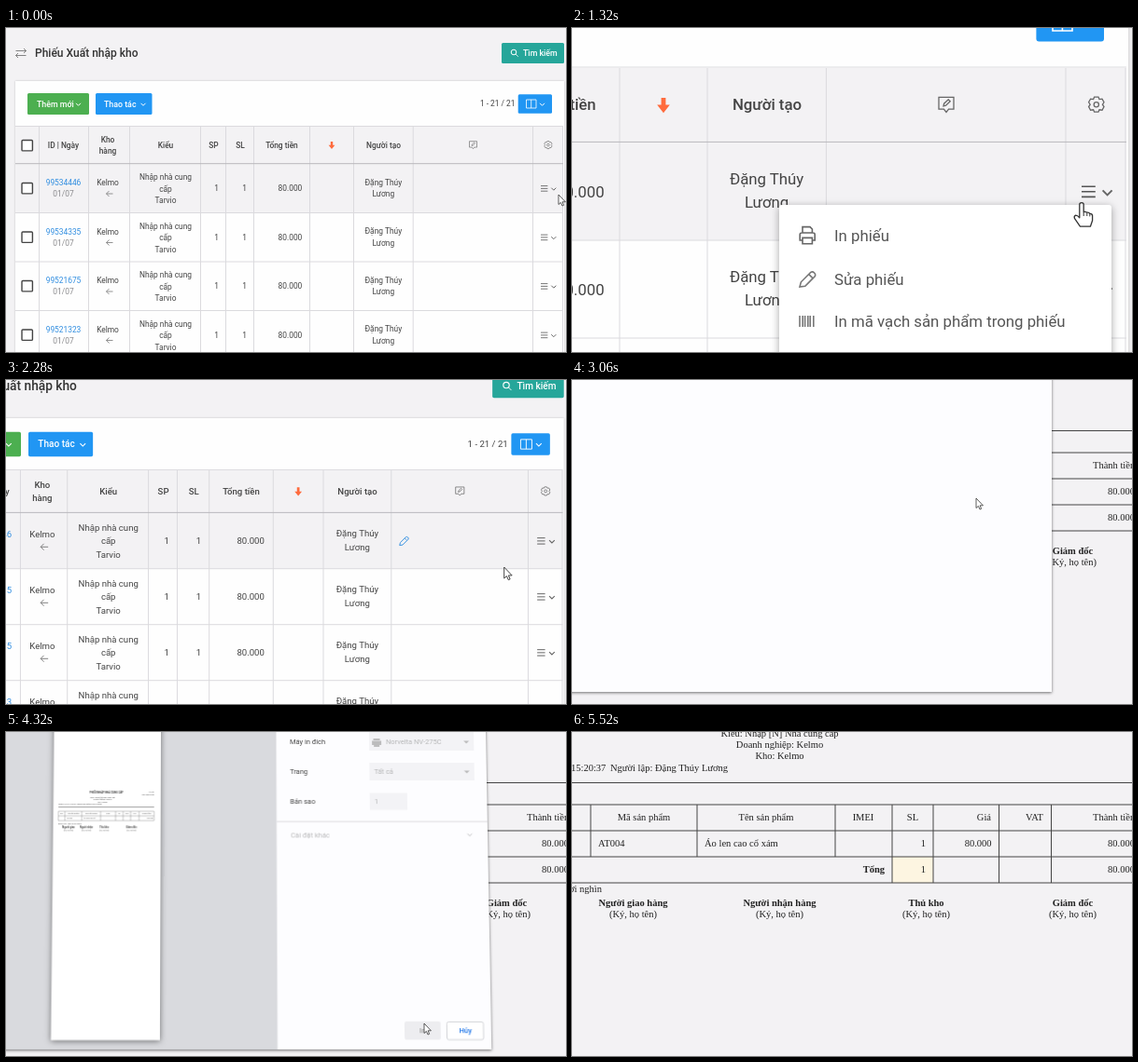
Recreate the animation shown at these times as an HTML page. Size 600x348 px, loop 5.7 s.

```html
<!DOCTYPE html>
<html lang="vi">
<head>
<meta charset="utf-8">
<title>Phiếu Xuất nhập kho</title>
<style>
html, body { margin: 0; width: 100%; height: 100%; overflow: hidden; background: #f3f2f4; }
#stage { position: relative; width: 600px; height: 348px; overflow: hidden; }
svg { position: absolute; left: 0; top: 0; width: 600px; height: 348px; overflow: visible; }
text { font: 8.4px Roboto, sans-serif; fill: #444; white-space: pre; }
.b { font-weight: 500; }
.m { text-anchor: middle; }
.e { text-anchor: end; }
.w { fill: #fff; font-size: 8.8px; font-weight: 500; }
.title { font-size: 12px; font-weight: 500; fill: #333; }
.id { fill: #2f8de0; }
.dim { fill: #8b8b8e; }
.line { fill: none; stroke: #666; stroke-width: .8; }
.thin { fill: none; stroke: #dbdade; vector-effect: non-scaling-stroke; }
#menu text { fill: #555; }
#paper text { font: 10.5px "Liberation Serif", serif; fill: #222; }
#paper .b { font-weight: 700; }
#dialog { position: absolute; left: -80px; top: -20px; width: 594px; height: 355px; background: #fdfdff;
  box-shadow: 0 1px 3px rgba(0,0,0,.55); transform-origin: 300px 20px; }
#dialog svg { left: 80px; top: 20px; }
#dialog text { font-size: 7.5px; }
#dialog .tiny { font-size: 2.1px; }
#dialog .head { font-size: 2.7px; font-weight: 700; }
#print rect { fill: #1a73e8; }
#print text { fill: #fff; }
.off .field { opacity: .38; }
.off #print rect { fill: #ededf0; }
.off #print text { fill: #999; }
</style>
</head>
<body>
<div id="stage">
  <svg><g id="table"></g><g id="paper"></g></svg>
  <div id="dialog"><svg id="form"></svg></div>
  <svg><g id="cursor" stroke-linejoin="round">
    <path id="arrow" d="M0 0V10.5L2.4 8.4 4 12 5.6 11.3 4.1 7.8H7.4Z" fill="#fff" stroke="#333" stroke-width=".8"/>
    <g id="hand" fill="#fff" stroke="#333" stroke-width=".65">
      <path d="M-1.1 .9Q-1.1 -.2 0 -.2Q1.1 -.2 1.1 .9V4.8Q2 4.4 2.9 5.1Q3.9 4.8 4.4 5.7Q5.7 5.6 5.8 6.8V9.4L4.7 12.6H-.8L-3.8 8.2Q-4.2 7 -3.2 6.6Q-2.2 6.6 -1.1 7.9Z"/>
      <path d="M1.1 5V7M2.9 5.3V7M4.4 5.8V7.2" fill="none" stroke-width=".5"/>
    </g>
  </g></svg>
</div>
<script>
const $ = id => document.getElementById(id);
const text = (x, y, s, c = '') => `<text x="${x}" y="${y}" class="${c}">${s}</text>`;
const rect = (x, y, w, h, fill, more = '') => `<rect x="${x}" y="${y}" width="${w}" height="${h}" fill="${fill}" ${more}/>`;
const path = (d, c = 'line', more = '') => `<path d="${d}" class="${c}" ${more}/>`;
const chevron = (x, y, color = '#666') =>
  path(`M${x - 2.5} ${y - 1.2}l2.5 2.5 2.5 -2.5`, 'line', `style="stroke:${color};stroke-width:1"`);
const pencil = (x, y, color) =>
  path(`M${x - 4} ${y + 4}l.7 -2.6 5.2 -5.2q1 -.6 1.9 .3t.3 1.9l-5.2 5.2ZM${x + .8} ${y - 2.8}l2 2`, 'line', `style="stroke:${color}"`);

const person = ['Đặng Thúy', 'Lương'];
const shop = 'Kelmo';

function tableRow(id, i) {
  const y = 146 + 52.5 * i;
  const at = (x, dy, s, c) => text(x, y + dy, s, c);
  return rect(10, y, 587, 52.5, i ? '#fefefe' : '#f3f2f4') +
    rect(17, y + 20.5, 11.4, 11.4, '#fff', 'rx="1" stroke="#444" stroke-width="1.4"') +
    at(61.5, 23, id, 'm id') + at(61.5, 35, '01/07', 'm dim') +
    at(109, 23, shop, 'm') + path(`M114.5 ${y + 32}h-7m3 -3l-3 3 3 3`, 'line', 'style="stroke:#777"') +
    at(171, 17, 'Nhập nhà cung', 'm') + at(171, 29.5, 'cấp', 'm') + at(171, 42, 'Tarvio', 'm') +
    at(228, 29.3, '1', 'e') + at(258, 29.3, '1', 'e') + at(317.3, 29.3, '80.000', 'e') +
    at(404.3, 22.5, person[0], 'm') + at(404.3, 35, person[1], 'm') +
    path(`M573 ${y + 23.6}h7.4m-7.4 2.8h7.4m-7.4 2.8h7.4`, 'line', 'style="stroke:#555"') + chevron(586.8, y + 26.9);
}

function menu() {
  const item = (y, s) => text(440.5, y + 3, s);
  const bars = [0, 1.6, 2.8, 4.4, 5.6, 7.4].map(x => `M${422 + x} 239v6`).join('');
  return `<g id="menu">` +
    rect(411, 179.5, 178, 120, '#fff', 'rx="1.5" style="filter:drop-shadow(0 1px 2px rgba(0,0,0,.35))"') +
    `<g id="hover">${rect(411, 184.5, 178, 23, '#f0f0f2')}</g>` +
    path('M423.5 194.5v-3.2h4l1.2 1.2v2M423.5 198.5h-1.4v-3q0 -1 1 -1h6q1 0 1 1v3h-1.4M423.5 197.2h5.2v3.2h-5.2Z') +
    pencil(426, 219.5, '#777') + path(bars, 'line', 'style="stroke:#777"') +
    item(196, 'In phiếu') + item(219.5, 'Sửa phiếu') + item(242, 'In mã vạch sản phẩm trong phiếu') + `</g>`;
}

function table() {
  const cols = [35.5, 88.5, 132.5, 208.5, 235.5, 265.5, 325.5, 372.5, 436.2, 564.5, 596.5];
  const heads = [[61.5, 'ID | Ngày'], [171, 'Kiểu'], [222.5, 'SP'], [251, 'SL'], [295.5, 'Tổng tiền'], [404.5, 'Người tạo']];
  return rect(0, 0, 600, 400, '#f3f2f4') +
    path('M10.5 24.5h11m-2.5 -2.5l2.5 2.5 -2.5 2.5M21.5 29.5h-11m2.5 -2.5l-2.5 2.5 2.5 2.5') +
    text(31, 31, 'Phiếu Xuất nhập kho', 'title') +
    rect(531, 16, 67, 22, '#26a69a', 'rx="1.5"') +
    `<circle cx="544" cy="26" r="2.8" fill="none" stroke="#fff"/>` + path('M546 28l2.8 2.8', 'line', 'style="stroke:#fff"') +
    text(554, 30, 'Tìm kiếm', 'w') +
    rect(10, 57, 588, 330, '#fefefe', 'style="filter:drop-shadow(0 0 1px rgba(0,0,0,.2))"') +
    rect(23, 70, 66, 23, '#4caf50', 'rx="1.5"') + text(33, 84.5, 'Thêm mới', 'w') + chevron(77.5, 82, '#fff') +
    rect(96, 70, 60.5, 23, '#2196f3', 'rx="1.5"') + text(105, 84.5, 'Thao tác', 'w') + chevron(147, 82, '#fff') +
    text(545.5, 83.8, '1 - 21 / 21', 'e') +
    rect(548.7, 71.2, 36.3, 20.5, '#2196f3', 'rx="1.5"') +
    path('M557.5 77h10.5v9h-10.5ZM562.7 77v9', 'line', 'style="stroke:#fff"') + chevron(574.5, 82, '#fff') +
    rect(10, 106, 587, 40, '#f3f2f4') +
    rect(17, 120.5, 11.4, 11.4, '#fff', 'rx="1" stroke="#444" stroke-width="1.4"') +
    heads.map(([x, s]) => text(x, 128.7, s, 'm b')).join('') +
    text(109, 122.5, 'Kho', 'm b') + text(109, 135, 'hàng', 'm b') +
    `<path d="M347.8 122h2.4v3.8h2.2l-3.4 4.3 -3.4 -4.3h2.2Z" fill="#ff6b3d"/>` +
    path('M496.5 121.7h8v6.4h-2.7l-1.3 1.6 -1.3 -1.6h-2.7ZM499 126.4l.3 -1.3 2.3 -2.2 1 1 -2.3 2.2Z', 'line', 'style="stroke-width:.65"') +
    path('M579.8 121.6h2.2l.5 1.2 1.5 -.2 1 1.8 -.8 1.2 .8 1.2 -1 1.8 -1.5 -.2 -.5 1.2h-2.2l-.5 -1.2 -1.5 .2 -1 -1.8 .8 -1.2 -.8 -1.2 1 -1.8 1.5 .2Z', 'line', 'style="stroke-width:.65"') +
    `<circle cx="580.9" cy="125.6" r="1.3" class="line" style="stroke-width:.65"/>` +
    ['99534446', '99534335', '99521675', '99521323'].map(tableRow).join('') +
    path(cols.map(x => `M${x} 106V387`).join('') + [105.5, 198.5, 251, 303.5].map(y => `M10 ${y}H597`).join(''), 'thin') +
    path('M10 145.7H597', 'thin', 'style="stroke:#b9b8bc"') +
    `<g id="edit">${pencil(448, 172.5, '#2f8de0')}</g>` + menu();
}

function paper() {
  const rows = [[95.2, [[77, 'Mã sản phẩm', 'm'], [208, 'Tên sản phẩm', 'm'], [312, 'IMEI', 'm'], [365, 'SL', 'm'],
      [449, 'Giá', 'e'], [505, 'VAT', 'e'], [558, 'Thành tiền']]],
    [123.2, [[28, 'AT004'], [142, 'Áo len cao cổ xám'], [379, '1', 'e'], [449.5, '80.000', 'e'], [574, '80.000']]],
    [151.2, [[335, 'Tổng', 'e b'], [379, '1', 'e'], [574, '80.000']]]];
  const signs = ['Người giao hàng', 'Người nhận hàng', 'Thủ kho', 'Giám đốc'];
  return rect(0, 0, 600, 348, '#f3f2f4') +
    text(222.5, 5, 'Kiểu: Nhập [N] Nhà cung cấp', 'm') + text(222.5, 17, 'Doanh nghiệp: ' + shop, 'm') +
    text(222.5, 29, 'Kho: ' + shop, 'm') + text(-1, 41.7, '15:20:37') + text(41, 41.7, 'Người lập: ' + person.join(' ')) +
    rect(343, 134, 44, 28, '#fdf5e1') +
    path('M0 54.5H600M0 78H600M0 106H600M0 134H600M0 162H600' +
      [20, 134, 282].map(x => `M${x} 78V134`).join('') + [343, 387, 457.5, 513.5].map(x => `M${x} 78V162`).join(''),
      'line', 'style="stroke-width:1;stroke:#444"') +
    rows.map(([y, cells]) => cells.map(([x, s, c]) => text(x, y, s, c)).join('')).join('') +
    text(32, 171.7, 'Tám mươi nghìn', 'e') +
    signs.map((s, i) => text(65.5 + 157 * i, 186.7, s, 'm b') + text(65.5 + 157 * i, 199, '(Ký, họ tên)', 'm')).join('');
}

function preview() {
  const cols = [57, 64, 82, 102, 118, 126, 134, 143, 159];
  return `<g id="preview">` +
    rect(51.5, -20, 114.5, 345.5, '#fff', 'style="filter:drop-shadow(0 1px 3px rgba(0,0,0,.5))"') +
    text(108, 66.5, 'PHIẾU NHẬP NHÀ CUNG CẤP', 'm head') + text(159, 65.5, '01/07', 'e tiny') + text(159, 68, 'Mã: 99534446', 'e tiny') +
    ['Kiểu: Nhập [N] Nhà cung cấp', 'Doanh nghiệp: ' + shop, 'Kho: ' + shop].map((s, i) => text(104, 71 + 2.5 * i, s, 'm tiny')).join('') +
    text(57, 78, 'Ngày 01/07 15:20:37 Người lập: ' + person.join(' '), 'tiny') +
    path('M57 80.5H159', 'line', 'style="stroke-width:.6"') +
    path('M57 85H159M57 90H159M57 95H159' + cols.map(x => `M${x} 85V95`).join(''), 'line', 'style="stroke-width:.35"') +
    ['STT', 'Mã sản phẩm', 'Tên sản phẩm', 'IMEI', 'SL', 'Giá', 'VAT', 'Thành tiền'].map((s, i) =>
      text((cols[i] + cols[i + 1]) / 2, 88.2, s, 'm tiny')).join('') +
    text(66, 93.2, 'AT004', 'tiny') + text(84, 93.2, 'Áo len cao cổ', 'tiny') + text(158, 93.2, '80.000', 'e tiny') +
    text(57, 99, 'Bằng chữ: Tám mươi nghìn', 'tiny') +
    [68, 87, 106, 135].map((x, i) => text(x, 103, ['Người giao', 'Người nhận', 'Thủ kho', 'Giám đốc'][i], 'm head') +
      text(x, 106.5, '(Ký, họ tên)', 'm tiny')).join('') + `</g>`;
}

function form() {
  const down = (x, y) => `<path d="M${x - 3} ${y - 1.5}h6l-3 3Z" fill="#555"/>`;
  return `<g id="body">` + rect(-80, -20, 369.5, 355, '#d9dade') + preview() +
    text(304, 13.5, 'Máy in đích') + text(304, 45.5, 'Trang') + text(304, 77, 'Bản sao') +
    `<g class="field">` + rect(389, 0, 112, 20, '#e3e4e8') + rect(389, 33, 112, 19, '#e3e4e8') + rect(389, 65.5, 40, 18, '#e3e4e8') +
    `<path d="M393.5 7h7v2h-7ZM392 9.5h10v4.5h-2v2h-6v-2h-2Z" fill="#555"/>` +
    text(407, 13.5, 'Norvelta NV-275C') + text(394, 45.5, 'Tất cả') + text(394, 77, '1') + down(493, 11) + down(493, 43) +
    text(304.5, 113, 'Cài đặt khác') + chevron(495, 110) + `</g>` +
    path('M289.5 96H514', 'thin') +
    `<g id="print">${rect(423, 306, 38, 19, '#1a73e8', 'rx="2"')}${text(442, 318.5, 'In', 'm b')}</g>` +
    rect(467.5, 306.5, 38.5, 18.5, '#fff', 'rx="2" stroke="#d4d5d9"') +
    `<text x="487" y="318.5" class="m b" style="fill:#1a73e8">Hủy</text></g>`;
}

$('table').innerHTML = table();
$('paper').innerHTML = paper();
$('form').innerHTML = form();

// Linear interpolation over rows of [time, ...values]
function track(keys, t) {
  const i = keys.findIndex(k => k[0] > t);
  if (i < 0) return keys[keys.length - 1].slice(1);
  const a = keys[i - 1], b = keys[i], u = (t - a[0]) / (b[0] - a[0]);
  return a.slice(1).map((v, n) => v + (b[n + 1] - v) * u);
}

const zoomKeys = [[0, 0], [480, 0], [681.7, 1], [2160, 1], [2300, 0]];
const pointerKeys = [[0, 592, 179], [60, 592, 179], [300, 586, 172], [720, 586, 172], [1080, 573, 178.5], [1320, 573, 178.5],
  [1860, 542, 197], [2700, 542, 197], [3060, 433, 127], [3660, 433, 127], [3900, 448, 313]];
const tiltKeys = [[0, -12], [2700, -12], [2940, 0], [4255, 0], [4320, 4.65], [4500, 17]];
const fadeKeys = [[0, 0], [2700, 0], [2940, 1], [4320, 1], [4560, 0]];

const show = (id, on) => { $(id).style.display = on ? '' : 'none'; };
const within = (t, a, b) => t >= a && t < b;

function draw(now) {
  const t = Math.floor(now % 5700 / 60) * 60;
  const [p] = track(zoomKeys, t), [x, y] = track(pointerKeys, t);
  const camera = `translate(${-600 * p} ${-169 * p}) scale(${1 + p})`;
  $('table').setAttribute('transform', camera);
  $('cursor').setAttribute('transform', `${camera} translate(${x} ${y})`);
  show('table', t < 2400);
  show('paper', t >= 2400);
  show('menu', within(t, 1320, 1860));
  show('hover', t >= 1560);
  show('edit', t >= 1920);
  show('cursor', t < 5520);
  show('hand', within(t, 300, 1920));
  show('arrow', !within(t, 300, 1920));
  show('dialog', within(t, 2760, 4560));
  show('body', t >= 3180);
  show('preview', t >= 3720);
  $('dialog').classList.toggle('off', !within(t, 3720, 4080));
  $('dialog').style.opacity = track(fadeKeys, t)[0];
  const tilt = track(tiltKeys, t)[0];
  $('dialog').style.transform = tilt ? `perspective(1320px) rotateX(${tilt}deg)` : 'none';
}

const start = performance.now();
function tick() {
  draw(performance.now() - start);
  requestAnimationFrame(tick);
}
tick();
</script>
</body>
</html>
```
